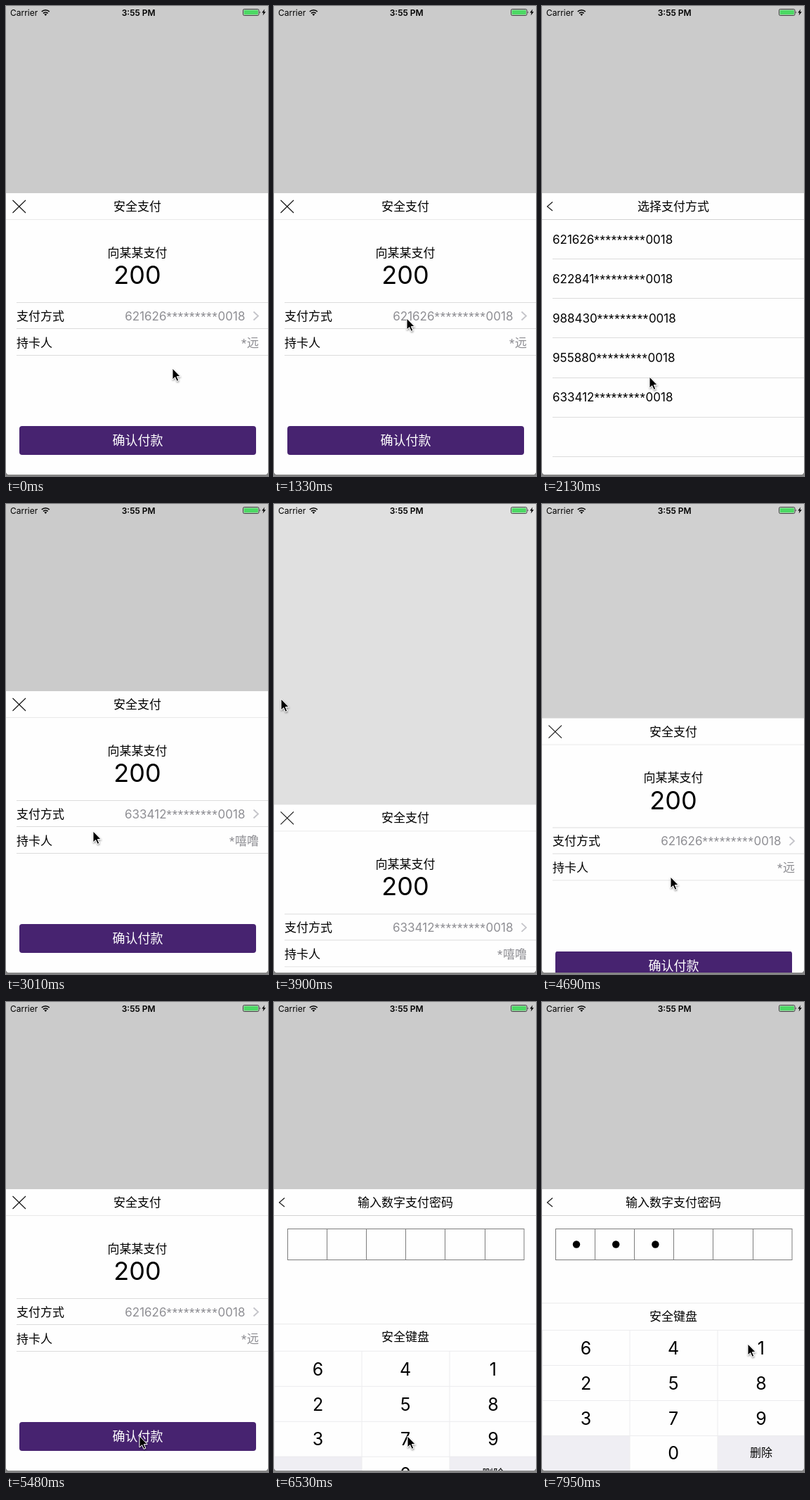
An HTML page for the animation above (8 s loop, 373 by 668 pixels).

```html
<!DOCTYPE html>
<html lang="zh-CN">
<head>
<meta charset="utf-8">
<title>安全支付</title>
<style>
  html, body { margin: 0; width: 100%; height: 100%; overflow: hidden; background: #fff; }
  svg { display: block; width: 100%; height: 100%; }
  text { font: 17px Inter, "Noto Sans CJK SC", "Noto Sans CJK JP", sans-serif; fill: #000; white-space: pre; }
  .mid { text-anchor: middle; }
  .end { text-anchor: end; }
  .grey { fill: #8e8e93; }
  .star { font-family: Roboto, sans-serif; letter-spacing: .8px; }
  .small { font-size: 12px; }
  .bold { font-weight: 600; }
  .amount { font-size: 36px; }
  .action { font-size: 18px; fill: #fff; }
  .key { font-size: 25px; }
  .delete { font-size: 16px; }
  .paper { fill: #fefefe; }
  .stroke { fill: none; stroke: #111; stroke-width: 1.1; }
  .rule { fill: #dcdcdc; }
  .soft { fill: #e9e9e9; }
  .bar { fill: #d2d2d2; }
  .cell { fill: none; stroke: #7d7d7d; }
  .pad { fill: #efeef3; }
</style>
</head>
<body>
<svg viewBox="0 0 373 668">
  <defs>
    <clipPath id="window"><path d="M0 0H373V661q0 5-5 5H5q-5 0-5-5Z"/></clipPath>
    <filter id="shadow" x="-50%" y="-50%" width="200%" height="200%">
      <feDropShadow dx=".5" dy="1.5" stdDeviation="1" flood-opacity=".45"/>
    </filter>
  </defs>
  <rect width="373" height="668" fill="#868686"/>
  <g clip-path="url(#window)">
    <rect width="373" height="668" fill="#fff"/>
    <rect x="80" y="506" width="215" height="30" fill="#562a78"/>
    <text class="mid action" x="188" y="528">确认付款</text>
    <rect id="dim" width="373" height="668" fill-opacity=".205"/>

    <g id="sheet">
      <rect class="paper" y="266" width="373" height="402"/>

      <g id="main">
        <path class="stroke" d="M9.5 276 28 294M28 276 9.5 294"/>
        <text class="mid" x="187" y="291">安全支付</text>
        <rect class="soft" y="303" width="373" height="1"/>
        <text class="mid" x="187" y="356.5">向某某支付</text>
        <text class="mid amount" x="187" y="395">200</text>
        <rect class="rule" x="15" y="421" width="358" height="1"/>
        <text x="15" y="446.5">支付方式</text>
        <path d="M352.5 434.5 359 440.5 352.5 446.5" fill="none" stroke="#c4c4c9" stroke-width="1.8"/>
        <rect class="rule" x="15" y="458" width="358" height="1"/>
        <text x="15" y="484.5">持卡人</text>
        <rect class="rule" x="15" y="496" width="358" height="1"/>
        <g id="firstCard"></g>
        <g id="lastCard"></g>
        <rect x="19" y="597" width="337" height="41" rx="4" fill="#472370"/>
        <text class="mid action" x="187.5" y="624">确认付款</text>
      </g>

      <g id="list">
        <path class="stroke" d="M15 278.5 7.5 285 15 291"/>
        <text class="mid" x="187" y="291">选择支付方式</text>
        <rect class="bar" y="303" width="373" height="1"/>
      </g>

      <g id="pin">
        <path class="stroke" d="M15 278.5 7.5 285 15 291"/>
        <text class="mid" x="187" y="291">输入数字支付密码</text>
        <rect class="bar" y="303" width="373" height="1"/>
        <rect class="cell" x="19.5" y="322.5" width="336.5" height="44"/>
      </g>

      <g id="keyboard">
        <rect class="paper" y="428" width="373" height="240"/>
        <rect class="soft" y="427.5" width="373" height="1"/>
        <text class="mid" x="187" y="452.5">安全键盘</text>
        <rect class="pad" y="616" width="125" height="50"/>
        <rect class="pad" x="250" y="616" width="123" height="50"/>
        <path d="M0 466.5H373M0 516.5H373M0 566.5H373M0 616.5H373M.5 466V616M125 466V666M250 466V666" fill="none" stroke="#ececee"/>
        <text class="mid delete" x="312" y="646">删除</text>
      </g>
    </g>

    <g id="status">
      <text class="small" x="6" y="13.5">Carrier</text>
      <g fill="none" stroke="#000" stroke-width="1.7">
        <path d="M50.8 8A7.8 7.8 0 0 1 61.8 8M53 10.4A4.7 4.7 0 0 1 59.6 10.4"/>
      </g>
      <path d="M54.4 11.7Q56.3 10.3 58.2 11.7L56.3 13.9Z"/>
      <text class="mid small bold" x="188.7" y="13.5">3:55 PM</text>
      <rect x="337.5" y="4.5" width="22.5" height="9" rx="1.8" fill="none" stroke="#333" stroke-width=".9"/>
      <rect x="338.7" y="5.7" width="20.1" height="6.6" rx=".6" fill="#4cd964"/>
      <path d="M361 7.3q1.5 1.7 0 3.4Z"/>
      <path d="M368.2 4.5 364.2 9.6H366.6L365.6 13.5 369.8 8.2H367.3Z"/>
    </g>
  </g>
  <g id="cursor">
    <path d="M0 0V16L3.7 12.6 6.2 18.3 8.8 17.2 6.3 11.6H11.2Z" stroke="#fff" stroke-width="1" filter="url(#shadow)"/>
  </g>
</svg>
<script>
const LOOP = 8000, TICK = 88.27, WIDTH = 373, DROP = 402, CELL = 56.2;
const get = id => document.getElementById(id);
const add = (id, markup) => get(id).insertAdjacentHTML('beforeend', markup);
const range = n => [...Array(n).keys()];

const cardNumber = prefix => `${prefix}<tspan class="star">*********</tspan>0018`;
const cardInfo = (prefix, holder) =>
  `<text class="end grey" x="340.5" y="446.5">${cardNumber(prefix)}</text>
   <text class="end grey" x="360" y="484.5"><tspan class="star">*</tspan>${holder}</text>`;

const prefixes = [621626, 622841, 988430, 955880, 633412];
add('firstCard', cardInfo(prefixes[0], '远'));
add('lastCard', cardInfo(prefixes[4], '嘻噜'));
prefixes.forEach((prefix, i) =>
  add('list', `<text x="15" y="${337.5 + i * CELL}">${cardNumber(prefix)}</text>`));
range(6).forEach(i =>
  add('list', `<rect class="rule" x="15" y="${Math.round(359 + i * CELL)}" width="358" height="1"/>`));
range(5).forEach(i =>
  add('pin', `<path class="cell" d="M${Math.floor(75.3 + i * CELL) + .5} 322V366"/>`));
range(3).forEach(i =>
  add('pin', `<circle id="dot${i}" cx="${49 + i * CELL}" cy="344.5" r="5.2"/>`));
[...'641258379'].forEach((digit, i) =>
  add('keyboard', `<text class="mid key" x="${62.5 + i % 3 * 124.7}" y="${501 + Math.floor(i / 3) * 49.8}">${digit}</text>`));
add('keyboard', '<text class="mid key" x="187.2" y="650.4">0</text>');

const animations = [];
const move = (x, y) => `translate(${x}px, ${y}px)`;
const along = x => move(x, 0);
const down = y => move(0, y);

// Each key is [ms, value, easing towards the next key].
function track(id, prop, keys) {
  const all = [[0, keys[0][1]], ...keys, [LOOP, keys.at(-1)[1]]];
  const frames = all.map(([ms, value, easing = 'linear']) => ({ offset: ms / LOOP, [prop]: value, easing }));
  const animation = get(id).animate(frames, { duration: LOOP, fill: 'both' });
  animation.pause();
  animations.push(animation);
}

// Each change is [ms, value] and eases in over 300 ms.
function ease(id, prop, format, from, changes, easing = 'ease-in-out') {
  const keys = [];
  for (const [ms, to] of changes) {
    keys.push([ms, format(from), easing], [ms + 300, format(to)]);
    from = to;
  }
  track(id, prop, keys);
}

// Flips between hidden and shown at the given times.
function toggle(id, shown, ...times) {
  track(id, 'opacity', times.flatMap((ms, i) => {
    const before = (shown + i) % 2;
    return [[ms, before], [ms, 1 - before]];
  }));
}

ease('main', 'transform', along, 0, [[1460, -WIDTH], [2520, 0], [5960, -WIDTH]]);
ease('list', 'transform', along, WIDTH, [[1460, 0], [2520, WIDTH]]);
ease('pin', 'transform', along, WIDTH, [[5960, 0]]);
ease('keyboard', 'transform', down, 242, [[6240, 0]], 'ease-out');
ease('sheet', 'transform', down, 0, [[3760, DROP], [4452, 0]]);
ease('dim', 'opacity', Number, 1, [[3760, 0], [4452, 1]]);
toggle('firstCard', 1, 2480, 4430);
toggle('lastCard', 0, 2480, 4430);
[7420, 7690, 7950].forEach((ms, i) => toggle('dot' + i, 0, ms));

track('cursor', 'transform', [
  [540, 237, 515], [620, 236, 516],
  [715, 236, 516, 'ease-in-out'], [1330, 189, 444],
  [1860, 189, 444], [2127, 153, 527, 'ease-out'], [2390, 143, 541],
  [2835, 143, 541], [3010, 124, 465], [3363, 62, 328, 'ease-out'], [3628, 10, 277],
  [3900, 10, 277, 'ease-in-out'], [4330, 183, 530],
  [5040, 183, 530, 'ease-in-out'], [5300, 189, 611],
  [5395, 189, 611], [5480, 190, 617],
  [6630, 190, 617, 'ease-in-out'], [7240, 293, 486],
].map(([ms, x, y, easing]) => [ms, move(x, y), easing]));

// The picture advances in even ticks.
function draw() {
  const tick = Math.floor(performance.now() % LOOP / TICK);
  const time = Math.min((tick + .1) * TICK, LOOP - 1);
  for (const animation of animations) animation.currentTime = time;
  requestAnimationFrame(draw);
}
draw();
</script>
</body>
</html>
```
